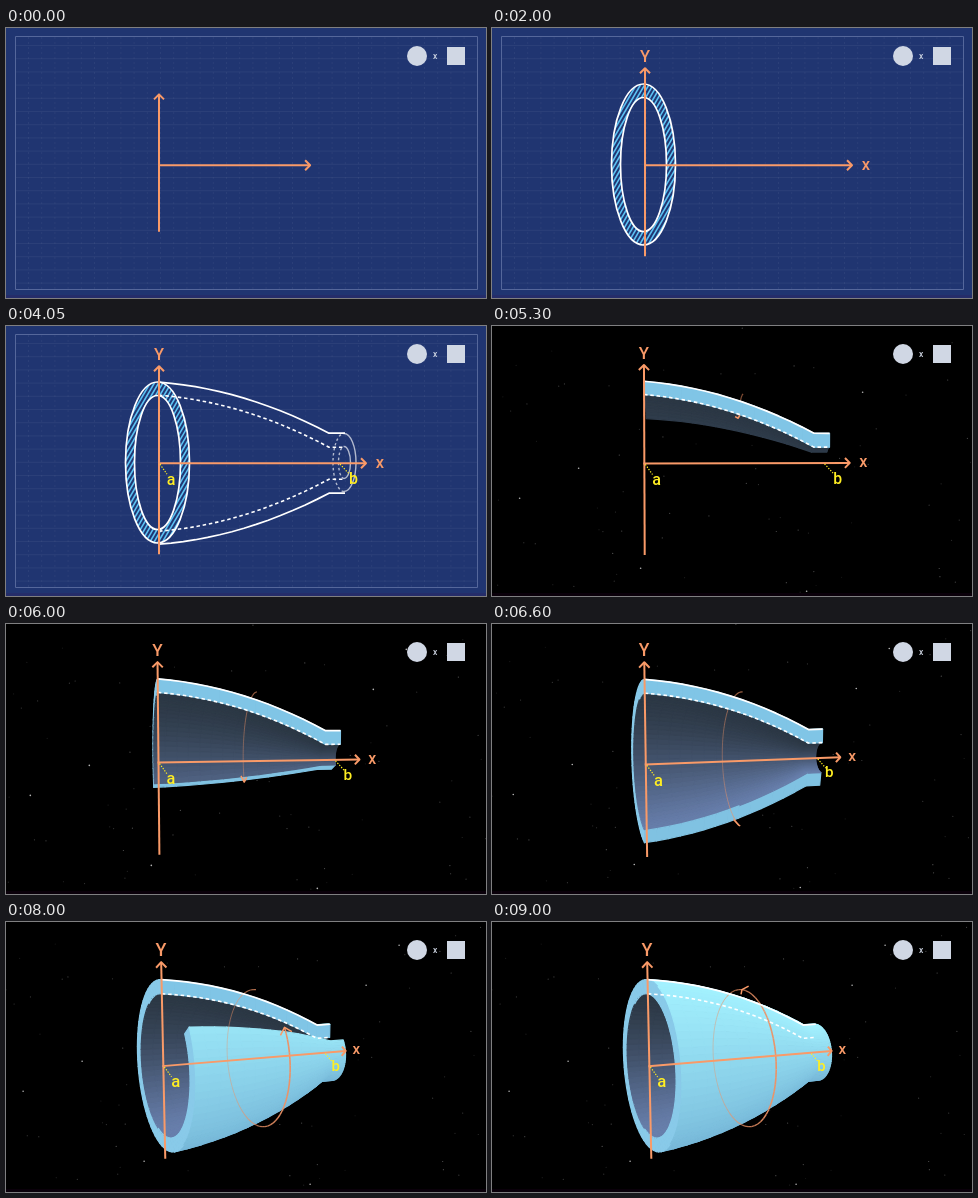
An HTML page with a canvas that plays this animation: 480x270 px, repeating every 9050 ms.

```html
<!DOCTYPE html>
<html lang="en">
<head>
<meta charset="utf-8">
<title>Solid of revolution</title>
<style>
html, body { margin: 0; width: 100%; height: 100%; overflow: hidden; background: #000; }
canvas { display: block; width: 100%; height: 100%; }
</style>
</head>
<body>
<canvas id="stage" width="480" height="270"></canvas>
<script>
const ctx = document.getElementById('stage').getContext('2d');
const LOOP = 9050, STEP = 50, TAU = Math.PI * 2;
const ORANGE = '#f99a68', YELLOW = '#ffee22', WHITE = '#ffffff';
const NECK = 170, END = 186, CAMERA = 670;

const clamp = v => Math.max(0, Math.min(1, v));
const ramp = (t, from, to) => clamp((t - from) / (to - from));
const sine = u => (1 - Math.cos(Math.PI * u)) / 2;
const mix = (a, b, u) => `rgb(${a.map((v, i) => Math.round(v + (b[i] - v) * u)).join()})`;

// Wall radii along the axis: a curved bell, then a straight neck.
const drop = x => { const u = Math.min(1, x / NECK); return 0.25 * u + 0.75 * u * u; };
const outer = x => 81 - 51 * drop(x);
const inner = x => 68 - 52 * drop(x);
const stations = [...Array(15).keys()].map(i => NECK * i / 14).concat(END);

// Perspective camera orbiting the point x = 87 on the axis; gives [x, y, depth, scale].
let yaw = 0, pitch = 0;
function project(x, y, z = 0) {
  const dx = x - 87;
  const x1 = dx * Math.cos(yaw) + z * Math.sin(yaw);
  const z1 = z * Math.cos(yaw) - dx * Math.sin(yaw);
  const y2 = y * Math.cos(pitch) - z1 * Math.sin(pitch);
  const z2 = z1 * Math.cos(pitch) + y * Math.sin(pitch);
  const s = CAMERA / (CAMERA - z2);
  return [240 + x1 * s, 137.2 - y2 * s, z2, s];
}
const around = (x, r, angle) => project(x, r * Math.cos(angle), -r * Math.sin(angle));

function polyline(points, color, width, dash = []) {
  ctx.beginPath();
  points.forEach(p => ctx.lineTo(p[0], p[1]));
  ctx.strokeStyle = color;
  ctx.lineWidth = width;
  ctx.setLineDash(dash);
  ctx.stroke();
  ctx.setLineDash([]);
}

function ellipse(x, y, rx, ry, from, to, dash = []) {
  ctx.beginPath();
  ctx.ellipse(x, y, rx, ry, 0, from, to);
  ctx.setLineDash(dash);
  ctx.stroke();
  ctx.setLineDash([]);
}

function label(text, [x, y, , scale = 1], color, size) {
  ctx.font = `500 ${size * scale}px Roboto, Inter, sans-serif`;
  ctx.textAlign = 'center';
  ctx.textBaseline = 'alphabetic';
  ctx.fillStyle = color;
  ctx.fillText(text, x, y);
}

function withAlpha(alpha, draw) {
  if (alpha <= 0) return;
  ctx.save();
  ctx.globalAlpha *= alpha;
  draw();
  ctx.restore();
}

function blueprint() {
  ctx.fillStyle = '#203571';
  ctx.fillRect(0, 0, 480, 270);
  ctx.strokeStyle = 'rgba(255,255,255,.05)';
  ctx.lineWidth = 1;
  ctx.beginPath();
  for (let y = 17.5; y < 261; y += 13.2) { ctx.moveTo(9, y); ctx.lineTo(471, y); }
  ctx.stroke();
  ctx.setLineDash([2, 3]);
  ctx.beginPath();
  for (let x = 22.5; x < 471; x += 13.2) { ctx.moveTo(x, 9); ctx.lineTo(x, 261); }
  ctx.stroke();
  ctx.setLineDash([]);
  ctx.strokeStyle = '#55679b';
  ctx.strokeRect(9.5, 8.5, 462, 253);
}

function space() {
  ctx.fillStyle = '#000';
  ctx.fillRect(0, 0, 480, 270);
  let seed = 7;
  const random = () => (seed = seed * 16807 % 2147483647) / 2147483647;
  const star = (x, y, size, light) => {
    ctx.fillStyle = `rgba(255,255,255,${light})`;
    ctx.beginPath();
    ctx.arc(x - yaw * 28 + 8, y - yaw * 8 + 2, size, 0, TAU);
    ctx.fill();
  };
  for (let i = 0; i < 80; i++) star(random() * 500, random() * 280, 0.6, 0.08 + random() * 0.25);
  [[365, 65], [398, 25], [22, 171], [143, 241], [309, 264], [81, 141]]
    .forEach(([x, y]) => star(x, y, 0.8, 0.7));
}

function bigRing(t) {
  const drawn = sine(ramp(t, 900, 1500)), filled = ramp(t, 1300, 1900);
  if (!drawn) return;
  ctx.save();
  ctx.beginPath();
  ctx.rect(110, 50, 90, 172 * filled);
  ctx.clip();
  ctx.beginPath();
  ctx.ellipse(151.5, 136.5, 32, 80.5, 0, 0, TAU);
  ctx.ellipse(151.5, 136.5, 23, 67, 0, 0, TAU);
  ctx.clip('evenodd');
  for (let x = 0; x < 200; x += 4.2) polyline([[x, 225], [x + 105, 45]], '#5cc3f4', 1.6);
  ctx.restore();
  ctx.strokeStyle = WHITE;
  ctx.lineWidth = 1.7;
  const start = -Math.PI / 2, stop = start + TAU * drawn;
  ellipse(151.5, 136.5, 32, 80.5, start, stop);
  ellipse(151.5, 136.5, 23, 67, start, stop);
}

function smallRing() {
  ctx.strokeStyle = WHITE;
  ctx.lineWidth = 1.4;
  const q = Math.PI / 2;
  ellipse(338, 136.5, 12, 29, -q, q);
  ellipse(338, 136.5, 11, 29, q, 3 * q, [2.5, 2.5]);
  ellipse(338, 136.5, 6.5, 16, -q, q);
  ellipse(338, 136.5, 5.5, 16, q, 3 * q, [2.5, 2.5]);
}

function profile(sign, progress) {
  if (!progress) return;
  const reach = END * progress;
  const xs = stations.filter(x => x < reach).concat(reach);
  const path = radius => xs.map(x => project(x, sign * radius(x)));
  polyline(path(outer), WHITE, 1.7);
  polyline(path(inner), WHITE, 1.6, [3.5, 2.8]);
}

function paint({ points, color }) {
  ctx.beginPath();
  points.forEach(p => ctx.lineTo(p[0], p[1]));
  ctx.closePath();
  ctx.fillStyle = ctx.strokeStyle = color;
  ctx.lineWidth = 1.2;
  ctx.fill();
  ctx.stroke();
}

function solid(sweep) {
  const faces = [];
  // Faces turned away from the camera run anticlockwise on screen.
  const add = (list, color, ...points) => {
    const area = points.reduce((sum, p, i) => {
      const q = points[(i + 1) % points.length];
      return sum + p[0] * q[1] - q[0] * p[1];
    }, 0);
    if (area > 0) list.push({ points, color, depth: points.reduce((sum, p) => sum + p[2], 0) });
  };
  const eachSpan = fn => stations.slice(1).forEach((x1, i) => fn(stations[i], x1));
  const cap = (list, angle, color, flip) => eachSpan((x0, x1) => {
    const p = [around(x0, inner(x0), angle), around(x0, outer(x0), angle),
      around(x1, outer(x1), angle), around(x1, inner(x1), angle)];
    add(list, color, ...(flip ? p.reverse() : p));
  });

  const count = Math.ceil(sweep / TAU * 72);
  for (let i = 0; i < count; i++) {
    const a = sweep * i / count, b = sweep * (i + 1) / count, c = Math.cos((a + b) / 2);
    const outside = mix([116, 180, 214], [164, 242, 255], (c + 1) / 2);
    const inside = mix([44, 56, 69], [104, 127, 172], ((1 - c) / 2) ** 1.5);
    eachSpan((x0, x1) => {
      const R0 = outer(x0), R1 = outer(x1), r0 = inner(x0), r1 = inner(x1);
      add(faces, outside, around(x0, R0, a), around(x0, R0, b), around(x1, R1, b), around(x1, R1, a));
      add(faces, inside, around(x0, r0, a), around(x1, r1, a), around(x1, r1, b), around(x0, r0, b));
    });
    add(faces, '#89cae9', around(0, inner(0), a), around(0, inner(0), b),
      around(0, outer(0), b), around(0, outer(0), a));
  }

  const front = [], open = sweep < 4.7;
  cap(open ? front : faces, 0, '#80c5e6', false);
  if (sweep > 0 && sweep < TAU) {
    cap(faces, sweep, mix([128, 194, 226], [166, 244, 255], clamp(-Math.sin(sweep) * 1.1)), true);
  }
  faces.sort((p, q) => p.depth - q.depth).forEach(paint);
  if (sweep > 0) turnArrow(sweep);
  front.forEach(paint);
}

// The arc is fainter and thinner on its far side.
function turnArrow(sweep) {
  const at = (angle, x = 98, r = 69) => around(x, r, angle);
  for (let i = 0; i < 60; i++) {
    const a = sweep * i / 60, near = -Math.sin(a);
    polyline([at(a), at(a + sweep / 60)], `rgba(236,146,102,${0.75 + 0.25 * near})`, 1.2 + 0.4 * near);
  }
  const back = sweep - 0.09;
  polyline([at(back, 94, 65), at(sweep), at(back, 102, 73)], ORANGE, 1.5);
}

function axes(t) {
  const g = 1 - 0.27 * (1 - ramp(t, 0, 600)) ** 3;
  const top = 97 * g, tip = 207 * g;
  const line = (...points) => polyline(points.map(p => project(...p)), ORANGE, 2);
  line([0, -91 * g], [0, top]);
  line([-1, 0], [tip, 0]);
  line([-5, top - 5], [0, top], [5, top - 5]);
  line([tip - 5, 5], [tip, 0], [tip - 5, -5]);
  withAlpha(ramp(t, 400, 800), () => {
    label('Y', project(0, 103), ORANGE, 16.5);
    label('x', project(221, -4.5), ORANGE, 16.5);
  });
}

function limits() {
  const mark = (text, x, lx, ly) => {
    polyline([project(x, -1), project(lx - 4, -11)], YELLOW, 1.2, [1.3, 1.5]);
    label(text, project(lx, ly), YELLOW, 16);
  };
  mark('a', 1, 12, -21.5);
  mark('b', 181, 194.5, -21);
}

function badges() {
  ctx.fillStyle = '#d0d7e4';
  ctx.beginPath();
  ctx.arc(411, 28, 10, 0, TAU);
  ctx.fill();
  ctx.fillRect(441, 19, 18, 18);
  label('x', [429.2, 31], '#d0d7e4', 8.5);
}

function render(t) {
  yaw = 26.4 * Math.PI / 180 * sine(ramp(t, 4200, 8100));
  pitch = yaw * 0.365;
  ctx.lineJoin = 'round';

  blueprint();
  const grown = sine(ramp(t, 2050, 2850));
  bigRing(t);
  withAlpha(0.65 * ramp(t, 2850, 3300), smallRing);
  profile(-1, grown);

  withAlpha(ramp(t, 4150, 4700), space);
  ctx.fillStyle = 'rgba(70,0,70,.15)';
  ctx.fillRect(0, 267, 480, 3);

  withAlpha(ramp(t, 4400, 4800), () => solid(TAU * ramp(t, 4800, 8600)));
  profile(1, grown);
  axes(t);
  withAlpha(ramp(t, 3300, 3700), limits);
  badges();
}

const begin = performance.now();
function tick() {
  const elapsed = (performance.now() - begin) % LOOP;
  render(Math.floor(elapsed / STEP) * STEP);
  requestAnimationFrame(tick);
}
tick();
</script>
</body>
</html>
```
